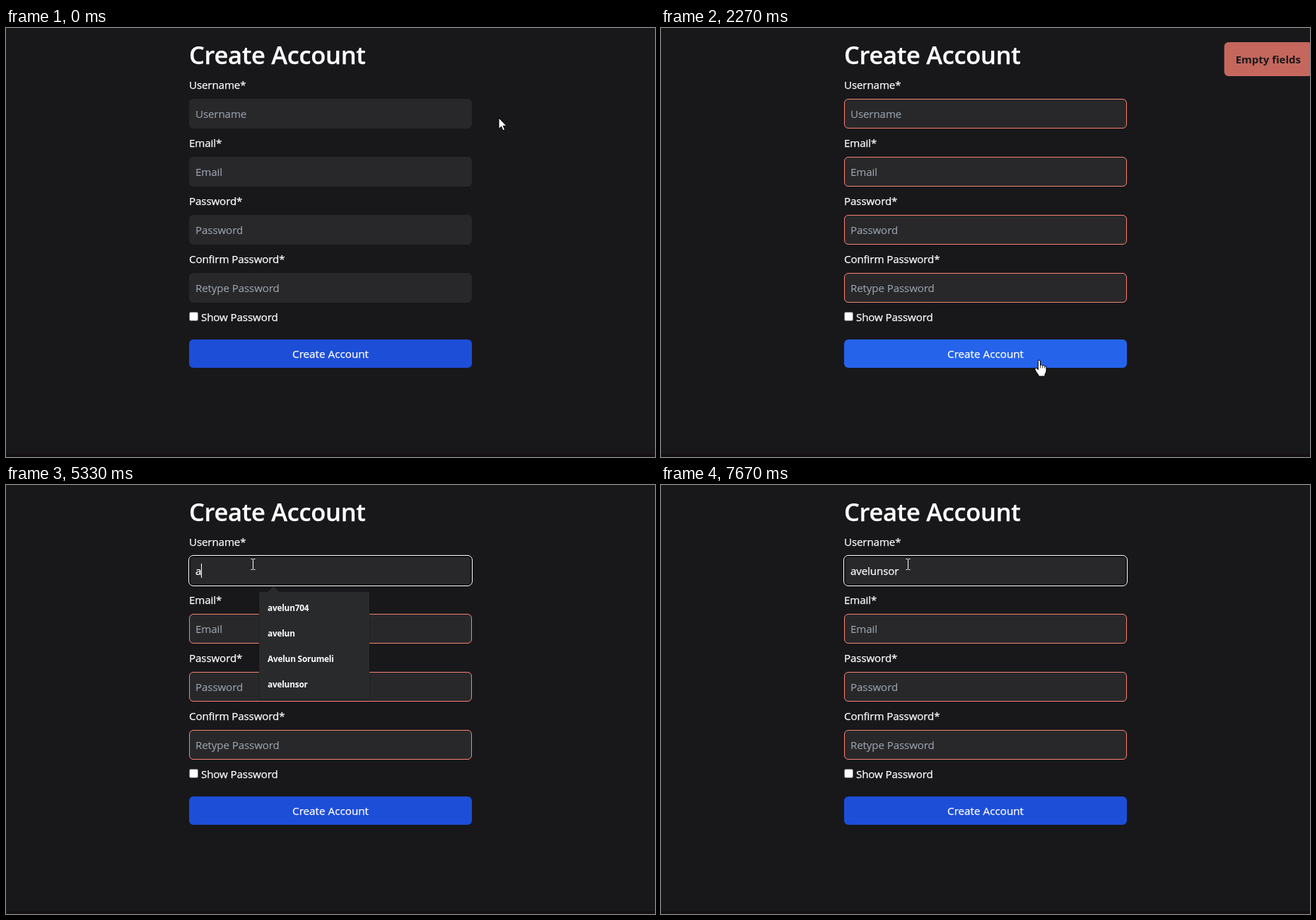
Write an HTML page that moves like this. It is 918x606 px and loops after 8 s.

```html
<!DOCTYPE html>
<html lang="en">
<head>
<meta charset="utf-8">
<title>Create Account</title>
<style>
  html, body { margin: 0; width: 100%; height: 100%; overflow: hidden; background: #18181b; }
  svg { display: block; width: 918px; height: 606px; }
  text {
    font: 15.1px "Open Sans", "Noto Sans", sans-serif; letter-spacing: -.1px; white-space: pre;
    color: #fff; fill: currentColor; stroke: currentColor; stroke-width: .25px;
  }
  .title { font-size: 34.5px; font-weight: 600; letter-spacing: -.3px; }
  .hint { color: #9ca3af; stroke-width: .1px; }
  .action { font-size: 15.25px; letter-spacing: 0; text-anchor: middle; }
  .alert { font-size: 15px; font-weight: 700; letter-spacing: 0; color: #18181b; stroke: none; }
  .option { font-size: 11.8px; font-weight: 700; letter-spacing: -.2px; stroke: none; }
  .box { fill: #28282a; }
  .error { fill: none; stroke: #fa8072; }
  .pointer { fill: #fff; stroke: #000; stroke-linejoin: round; }
</style>
</head>
<body>
<svg viewBox="0 0 918 606">
  <rect width="918" height="606" fill="#18181b"/>
  <rect y="602" width="918" height="4" fill="#130f13"/>
  <text class="title" x="259" y="51">Create Account</text>
  <g id="fields"></g>
  <g id="focus" fill="none">
    <rect x="260" y="101" width="398" height="40" rx="5" stroke="#101010" stroke-width="2"/>
    <rect x="258.5" y="99.5" width="401" height="43" rx="6.5" stroke="#fff"/>
  </g>
  <text id="value" x="268" y="127"></text>
  <rect id="caret" y="111" width="1" height="20" fill="#fff"/>
  <rect x="259.5" y="401.5" width="12" height="12" rx="2" fill="#fff" stroke="#767676"/>
  <text x="276" y="414">Show Password</text>
  <rect id="button" x="259" y="440" width="400" height="40" rx="6"/>
  <text class="action" x="459" y="466">Create Account</text>
  <g id="menu">
    <rect id="shade" x="357" y="151" width="158" rx="3" fill="#000" opacity=".18"/>
    <path d="M369.5 152L378.5 143L387.5 152Z" fill="#292a2c"/>
    <rect id="panel" x="358" y="151" width="156" rx="2" fill="#292a2c"/>
    <g id="options"></g>
  </g>
  <g id="toast">
    <rect x="773" y="20" width="125" height="48" rx="6" fill="#fa8072"/>
    <text class="alert" x="789" y="50">Empty fields</text>
  </g>
  <g id="cursor">
    <path id="arrow" class="pointer" d="M0 0V15.5L3.6 12.2L6 17.8L8.6 16.7L6.2 11.2H11Z"/>
    <g id="hand" class="pointer">
      <path d="M-1.6 1.2Q0 -1 1.6 1.2V7.2Q3.6 6 4.8 7.8Q6.6 6.8 7.6 8.6Q9.6 8 10 10V15.5Q9.6 18.5 8 20V23H-1V21.3Q-4.5 17 -6 13.6Q-6.6 11.2 -4.4 11.2Q-2.6 11.6 -1.6 13.6Z"/>
      <path d="M1.6 7V11.5M4.8 8V11.5M7.6 9V11.5" fill="none" stroke-width=".8"/>
    </g>
    <path id="beam" d="M-3 -7.5H-.7M.7 -7.5H3M0 -7V7M-3 7.5H-.7M.7 7.5H3" fill="none" stroke="#fff"/>
  </g>
</svg>
<script>
const LOOP = 8000, STEP = 1000 / 15;
const SUBMIT = 2130, FOCUS = 3600, ERASE = 6600;
const BLINK = 520, MENU_LAG = 130;
const NAME = 'avelunsor';
const OPTIONS = ['avelun704', 'avelun', 'Avelun Sorumeli', NAME];
const FIELDS = [['Username*', 'Username'], ['Email*', 'Email'], ['Password*', 'Password'], ['Confirm Password*', 'Retype Password']];

// one letter, a fast run of six, then three slower ones after the erased letter
const run = (from, gap, n) => Array.from({ length: n }, (_, i) => from + gap * i);
const KEYS = [5200, ...run(5450, 80, 6), ...run(6836, 154, 3)];

const el = id => document.getElementById(id);
const show = (id, on) => el(id).style.display = on ? '' : 'none';
const ramp = (t, from, to) => Math.min(1, Math.max(0, (t - from) / (to - from)));
const smooth = u => u * u * (3 - 2 * u);
const mix = (a, b, u) => a + (b - a) * u;
const fieldTop = i => 100 + i * 82;

const keysBy = t => KEYS.filter(k => k <= t);
const typedBy = t => keysBy(t).length - (t >= ERASE ? 1 : 0);

el('fields').innerHTML = FIELDS.map(([label, hint], i) => {
  const y = fieldTop(i);
  return `<text x="259" y="${y - 14}">${label}</text>
    <rect class="box" x="259" y="${y}" width="400" height="42" rx="6"/>
    <rect class="error" id="error${i}" x="259.5" y="${y + .5}" width="399" height="41" rx="5.5"/>
    <text class="hint" id="hint${i}" x="268" y="${y + 27}">${hint}</text>`;
}).join('');

// glide to the button, dip below its edge, then glide up to the first field
function position(t) {
  const down = smooth(ramp(t, 70, 870));
  const dip = ramp(t, 870, 1400);
  const up = smooth(ramp(t, 2800, 3400));
  const x = mix(mix(697, 428, down), 535, dip);
  const y = mix(mix(127, 453, down), 469, dip) + 23 * Math.sin(Math.PI * dip);
  return [mix(x, 349.5, up), mix(y, 112, up)];
}

function drawCursor(t) {
  const [x, y] = position(t);
  const inside = x > 259 && x < 659;
  const hover = inside && y >= 440 && y < 480;
  const overField = inside && FIELDS.some((_, i) => y >= fieldTop(i) && y < fieldTop(i) + 42);
  el('cursor').setAttribute('transform', `translate(${x} ${y})`);
  show('hand', hover);
  show('beam', overField);
  show('arrow', !hover && !overField);
  el('button').setAttribute('fill', hover ? '#2563eb' : '#1d4ed8');
}

function drawForm(t) {
  const focused = t >= FOCUS, count = typedBy(t);
  FIELDS.forEach((_, i) => show('error' + i, t >= SUBMIT && !(focused && i === 0)));
  show('focus', focused);
  show('hint0', !count);
  el('value').textContent = NAME.slice(0, count);

  const lastKey = Math.max(FOCUS, ...keysBy(t));
  show('caret', focused && Math.floor((t - lastKey) / BLINK) % 2 === 0);
  const end = count ? el('value').getComputedTextLength() : 0;
  el('caret').setAttribute('x', 268 + Math.round(end));
}

function drawMenu(t) {
  const query = NAME.slice(0, Math.min(typedBy(t), typedBy(t - MENU_LAG)));
  const found = OPTIONS.filter(s => s.toLowerCase().startsWith(query));
  const open = query && query !== NAME;
  show('menu', open);
  if (!open) return;
  const height = 8 + found.length * 36;
  el('panel').setAttribute('height', height);
  el('shade').setAttribute('height', height + 1);
  el('options').innerHTML = found
    .map((s, i) => `<text class="option" x="370" y="${178 + i * 36}">${s}</text>`).join('');
}

function drawToast(t) {
  const enter = 1 - (1 - ramp(t, 2104, 2374)) ** 1.5;
  const leave = ramp(t, 4624, 4804) ** 1.4;
  const p = t < SUBMIT ? 0 : enter * (1 - leave);
  el('toast').setAttribute('transform', `translate(${100 * (1 - p)} 0)`);
  el('toast').setAttribute('opacity', p);
}

const start = performance.now();
function frame() {
  const now = (performance.now() - start) % LOOP;
  // everything advances at 15 pictures a second
  const t = Math.floor((now + 4) / STEP) * STEP + 4;
  drawCursor(t);
  drawForm(t);
  drawMenu(t);
  drawToast(t);
  requestAnimationFrame(frame);
}
frame();
</script>
</body>
</html>
```
